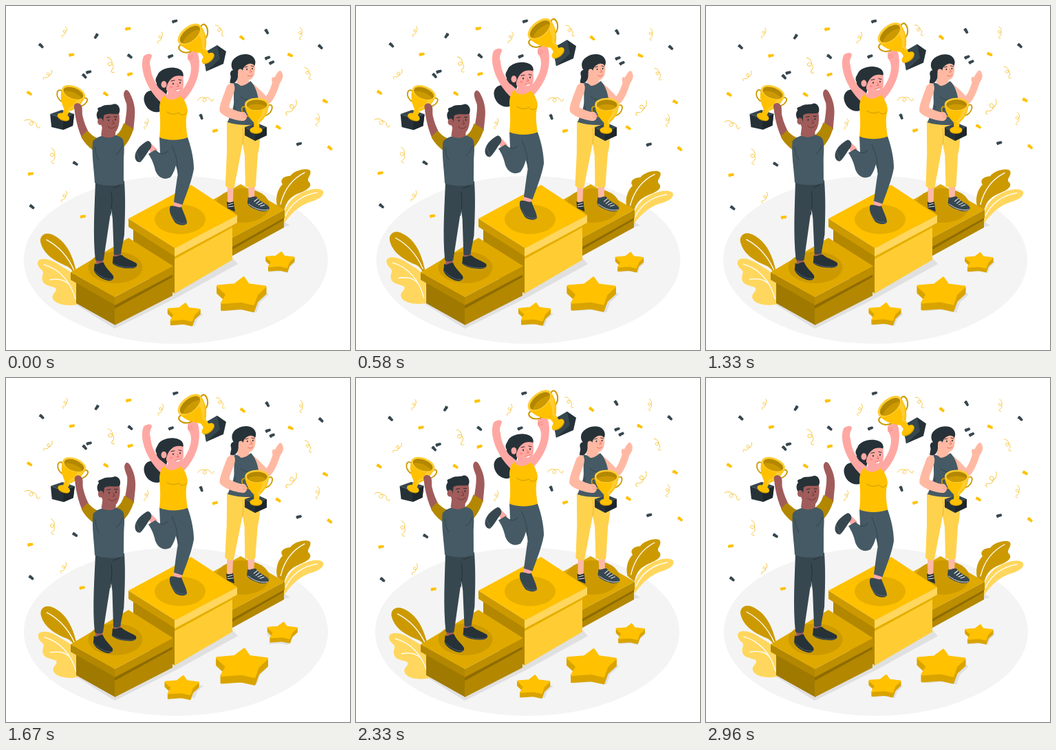
Recreate the animation shown at these times as an HTML page with a canvas. Size 500 px wide and 500 px high, loop 3000 ms.

```html
<!DOCTYPE html>
<html lang="en">
<head>
<meta charset="utf-8">
<title>Winners on a podium</title>
<style>
html, body { margin: 0; width: 100%; height: 100%; overflow: hidden; background: #fff; }
canvas { display: block; width: 500px; height: 500px; }
</style>
</head>
<body>
<canvas id="stage"></canvas>
<script>
const canvas = document.getElementById('stage');
const ctx = canvas.getContext('2d');
const ratio = window.devicePixelRatio || 1;
canvas.width = canvas.height = 500 * ratio;

const GOLD = '#ffc100', LIGHT = '#ffcd33', PALE = '#ffd75e', MID = '#cc9a00', DEEP = '#b38700';
const SIDE_TOP = '#dfa900', SIDE_SPOT = '#cc9a00', SIDE_RIM = '#bc8e00', SIDE_LEFT = '#a07900', SIDE_SHADE = '#8f6c00';
const INK = '#263238', SLATE = '#37474f', STEEL = '#455a64';
const PINK = '#ffa8a3', PEACH = '#ffb9a3', BROWN = '#a05c5a', RED = '#e2574c';

const cache = {};
const path = d => cache[d] || (cache[d] = new Path2D(d));
const fill = (color, d) => { ctx.fillStyle = color; ctx.fill(path(d)); };
const line = (color, d, width = 1) => {
  ctx.strokeStyle = color;
  ctx.lineWidth = width;
  ctx.stroke(path(d));
};
const oval = (color, x, y, rx, ry, turn = 0) => {
  ctx.fillStyle = color;
  ctx.beginPath();
  ctx.ellipse(x, y, rx, ry, turn, 0, Math.PI * 2);
  ctx.fill();
};
const rad = deg => deg * Math.PI / 180;

// Draws inside a saved state, turned and scaled around a point.
function at(x, y, deg, scale, draw) {
  ctx.save();
  ctx.translate(x, y);
  ctx.rotate(rad(deg));
  ctx.scale(scale, scale);
  draw();
  ctx.restore();
}
const pivot = (x, y, deg, scale, draw) =>
  at(x, y, deg, scale, () => { ctx.translate(-x, -y); draw(); });

// Linear interpolation through [phase, value] pairs.
function track(keys, p) {
  let i = 1;
  while (i < keys.length - 1 && p > keys[i][0]) i++;
  const [p0, v0] = keys[i - 1], [p1, v1] = keys[i];
  return v0 + (v1 - v0) * (p - p0) / (p1 - p0);
}
const WIND = [[0, 0], [.25, 1], [.75, -1], [1, 0]];
const JUMP = [[0, 0], [.5, -10], [1, 0]];
const BEAT = [[0, 1], [.1, 1.1], [.2, 1], [.4, 1], [.5, 1.1], [.6, 1], [1, 1]];
const SHAKE = [[0, 0], [.1, -1], [.2, 2], [.3, -4], [.4, 4], [.5, -4], [.6, 4], [.7, -4], [.8, 2], [.9, -1], [1, 0]];

const inkBits = [[51,58,35], [131,44,115], [180,73,30], [120,96,-25], [114,102,40], [239,73,-30], [245,22,-25],
  [379,37,50], [380,75,-30], [386,82,-35], [457,59,35], [284,161,60], [101,229,25], [38,292,30], [426,200,-25]];
const goldBits = [[177,33,-20], [95,71,-20], [34,127,25], [180,99,-25], [145,128,25], [36,244,-20], [112,306,-20],
  [343,46,30], [413,71,15], [304,181,-25], [396,176,25], [464,138,20], [471,206,30]];
const curls = [[84,38,100,.65], [60,100,125,.75], [151,86,60,1], [38,172,15,1], [67,218,75,.95], [84,277,105,.7],
  [223,46,100,.72], [310,36,45,.8], [427,40,80,.72], [438,98,55,.8], [290,137,-10,.95], [414,147,115,1.05],
  [452,165,85,.75], [203,171,95,.65]];

function confetti() {
  for (const [x, y, turn, scale] of curls)
    at(x, y, turn, scale, () => line('#f7c640',
      'M-12-2C-8-7 0-6 1-1C1 3-5 3-4-1C-2-6 6-4 7 0C8 4 11 4 12 0', .9 / scale));
  const bit = color => ([x, y, turn]) =>
    at(x, y, turn, 1, () => fill(color, 'M-4-2Q-2-3 0-2L4-1L4 2Q1 3 0 2L-4 2Z'));
  inkBits.forEach(bit(SLATE));
  goldBits.forEach(bit(GOLD));
}

function leaves() {
  fill(MID, 'M104 394C98 363 88 341 66 332C56 328 47 335 51 346C56 362 71 371 88 378C95 381 100 388 102 398Z');
  line('#fff', 'M59 340C76 349 90 364 99 384', 1.3);
  fill(PALE, 'M104 434C90 437 73 434 69 427C64 418 76 416 72 410C66 407 55 407 53 399C51 391 57 389 52 384C45 378 43 369 53 368C66 367 76 376 85 381C96 387 102 394 104 405Z');
  line('#fff', 'M55 376C77 382 94 400 101 426M64 398C77 396 85 398 92 405', 1.3);
  fill(MID, 'M394 290C391 276 396 265 402 259C397 252 405 247 413 247C418 239 437 234 442 239C445 246 435 251 441 256C446 263 436 268 426 272C412 278 407 285 404 298Z');
  line('#fff', 'M434 242C416 251 404 268 399 288', 1.3);
  fill(PALE, 'M403 312C403 296 412 281 425 274C440 265 456 263 461 269C463 277 452 281 447 283C432 287 419 295 404 316Z');
  line('#fff', 'M452 271C429 275 414 288 406 305', 1.3);
}

function groundShadow() {
  fill('#e0e0e0', 'M95 430L158 469L250 423L337 375L329 366L158 458L102 428ZM330 363L404 321L413 319L405 314L330 355Z');
}

function rightBlock() {
  fill(DEEP, 'M329 337L404 298V322L329 363Z');
  fill(SIDE_RIM, 'M329 337L405 296V308L329 350Z');
  fill(SIDE_SHADE, 'M329 350L404 308V311L329 354Z');
  fill(SIDE_TOP, 'M341 259L405 296L329 337L270 299Z');
  oval(SIDE_SPOT, 344, 290, 39, 25);
}

function middleBlock() {
  fill(DEEP, 'M185 322L246 360V418L185 382Z');
  fill(LIGHT, 'M245 360L329 316V369L245 418Z');
  fill('#e6ae00', 'M245 364L329 319V322L245 368Z');
  fill(MID, 'M178 309L246 352V364L178 321Z');
  fill(PALE, 'M245 352L336 304V315L245 364Z');
  fill(GOLD, 'M269 260L336 304L246 352L178 309Z');
  oval('#e6ae00', 253, 310, 37, 21.5);
}

function leftBlock() {
  fill(SIDE_LEFT, 'M102 400L159 434V464L102 432Z');
  fill(DEEP, 'M158 434L242 389V421L158 464Z');
  fill(SIDE_SHADE, 'M158 435L242 390V394L158 440Z');
  fill(DEEP, 'M94 387L159 423V435L94 398Z');
  fill(SIDE_RIM, 'M158 423L243 378V390L158 435Z');
  fill(SIDE_TOP, 'M178 337L243 378L158 423L94 387Z');
  oval(SIDE_SPOT, 159, 380, 39.5, 23);
}

function star(x, y, scale, shadow) {
  const top = 'M3-23L10-13L34-10L22 1L17 15L-1 11L-28 13L-21 1L-34-11L-10-13Z';
  at(x, y, 0, scale, () => {
    const layer = (color, dy) => {
      ctx.save();
      ctx.translate(0, dy);
      fill(color, top);
      line(color, top, 3);
      ctx.restore();
    };
    if (shadow) {
      ctx.translate(4, 0);
      layer('#e0e0e0', 11);
    } else {
      for (let d = 10; d > 0; d--) layer('#d9a400', d);
      layer(GOLD, 0);
    }
  });
}
const stars = shadow => {
  star(397, 372, .58, shadow);
  star(342, 418, 1, shadow);
  star(260, 447, .66, shadow);
};

function cup(x, y, turn, scale) {
  at(x, y, turn, scale, () => {
    line(MID, 'M-14 4C-24-1-23 16-9 17M14 3C24-6 24 14 9 16', 1.7);
    oval(MID, -1, 36, 8.5, 4.5);
    oval(GOLD, -1, 35, 8.5, 4.3);
    fill(GOLD, 'M-16.5 0C-16 12-9 20-4 25L-4 34H3L4 25C10 20 16 12 16.5 0Z');
    fill(LIGHT, 'M8 8L15 5C13 13 8 19 4 22L2 30L1 22C5 18 7 13 8 8Z');
    oval(LIGHT, 0, 0, 16.5, 9);
    oval(DEEP, 0, .5, 14, 7);
    fill(MID, 'M-13 3C-5-2 7-1 13 3C8 9-8 10-13 3Z');
  });
}

function rightWoman() {
  fill(PEACH, 'M322 258H331L330 287H322ZM352 258H362L361 282H353Z');
  fill(INK, 'M321 284C324 287 328 285 331 284L333 299L322 294Z');
  fill(SLATE, 'M352 278C355 280 359 276 364 277C369 285 380 287 383 293C383 298 377 299 370 298C361 295 352 292 351 286Z');
  line('#fff', 'M361 284L366 280M364 287L369 283M367 289L373 286M370 291L376 289');
  line('#fff', 'M353 288C363 296 374 298 381 296', .8);
  line('#fff', 'M323 289L330 287M323 292L331 291', .9);
  fill('#ffd24d', 'M321 167C333 171 351 171 366 170C370 185 370 200 366 216L363 262C359 265 352 264 348 262L347 217L344 200L332 263C328 267 322 265 319 261L321 214Z');
  line('#e6b52d', 'M344 178C346 186 345 194 344 201', 1);
  // Raised arm, neck and top
  fill(PEACH, 'M357 112C364 116 373 126 378 131C382 126 385 118 387 111C385 106 387 101 390 104C393 99 397 91 400 95C404 101 402 107 398 112C394 125 388 140 381 143C374 143 364 134 358 128Z');
  fill(PEACH, 'M338 98L353 104V113C349 119 339 118 335 111Z');
  fill(STEEL, 'M331 112C335 111 337 113 341 116C346 116 351 113 355 109C361 114 365 124 367 136C366 150 364 160 366 172C351 174 334 173 322 169C327 157 332 147 331 135Z');
  line(SLATE, 'M341 132C347 137 356 138 363 133M333 145C332 154 334 160 339 164');
  // Ponytail, face and fringe
  fill(INK, 'M335 94C329 91 325 95 326 100C328 105 324 109 326 113C333 114 338 107 337 98Z');
  fill(PEACH, 'M340 84C349 76 358 77 361 83C363 95 361 104 355 107C348 109 342 105 340 100Z');
  fill(INK, 'M337 98C330 95 326 90 328 82C331 73 345 68 354 71C362 74 364 82 361 87C357 81 349 84 345 90L342 99Z');
  oval(PEACH, 340.5, 96, 3.5, 4.5);
  oval(INK, 350, 92, .9, 1.2);
  oval(INK, 358, 91, .9, 1.2);
  line(INK, 'M347 89L351 88M356 87L360 88', .9);
  line(RED, 'M351 101C354 103 357 102 358 100M355 92L357 96H354', .8);
  // Trophy and the arm that holds it
  fill(INK, 'M347 176L362 184L379 176V188L362 196L347 188Z');
  fill(SLATE, 'M347 176L365 170L379 176L362 184Z');
  fill('#1d272c', 'M362 184L379 176V188L362 196Z');
  cup(364.5, 143, 0, 1.06);
  fill(PEACH, 'M326 112C333 111 334 120 330 129C327 138 323 145 325 148C332 151 340 155 346 154C352 157 351 166 345 167C335 167 316 161 311 154C308 148 317 128 321 116Z');
  line('#e98f81', 'M343 157L350 159M344 161L350 162', .7);
}

function middleWoman() {
  // Loose hair, with the far arm in front of it
  fill(INK, 'M219 112C220 119 216 123 210 123C203 124 199 131 201 139C203 148 212 156 222 154C229 151 232 144 231 136L236 118Z');
  fill(PINK, 'M200 73C204 69 211 68 212 72C212 76 207 80 210 88C211 103 218 117 234 129L228 143C213 130 202 111 199 95C197 85 198 78 200 73Z');
  fill(INK, 'M220 101C223 91 240 87 250 91C257 93 259 99 257 104C247 105 240 109 237 117L233 125C226 124 219 118 219 112C216 108 218 104 220 101Z');
  // Back leg
  fill(PINK, 'M206 204L211 200L220 209L213 218Z');
  fill(SLATE, 'M206 196C211 197 213 203 210 207C205 213 200 223 195 227C190 228 186 222 188 215C191 206 198 200 206 196Z');
  line('#607078', 'M189 213C192 218 194 222 195 226', .7);
  fill(STEEL, 'M223 190L252 192C252 214 247 240 239 249C229 254 221 249 217 239C215 229 211 221 207 215L217 209C220 211 222 213 224 214Z');
  // Front leg
  fill(PINK, 'M245 280L257 284L254 296L243 293Z');
  fill(STEEL, 'M226 191L264 191C270 208 273 224 273 237C270 254 263 271 256.5 289L244 285C246 270 248 254 250 243C246 229 244 220 241 210Z');
  line(SLATE, 'M241 203C246 213 250 229 250 244M224 214C228 216 232 214 235 211', 1.1);
  fill(SLATE, 'M239 291C245 289 251 294 255 292C258 301 263 309 263 316C259 320 251 319 246 315C241 308 237 300 238 293Z');
  line('#607078', 'M241 305C246 315 253 317 262 316', .7);
  // Near arm, neck and top
  fill(PINK, 'M264 71C266 66 275 64 279 69C282 80 281 92 279 101C275 116 268 127 258 138L248 132C258 121 265 111 268 99C270 90 269 82 264 77Z');
  fill(PINK, 'M236 119L250 126L257 132C254 145 237 147 229 134C234 132 236 127 236 119Z');
  fill(GOLD, 'M230 130C234 137 243 139 254 131C259 135 263 143 264 152C261 163 261 174 264 191C252 196 235 196 223 191C225 175 224 161 223 149C223 140 226 134 230 130Z');
  line(MID, 'M234 154C240 158 246 158 251 155C255 160 260 159 263 155');
  // Face
  fill(PINK, 'M233 108C240 99 252 96 257 101C259 112 258 123 254 128C247 132 237 129 233 122Z');
  fill(INK, 'M226 115C223 102 239 91 252 93C256 94 258 98 257 102C247 99 239 104 235 113L232 121Z');
  oval(PINK, 229.5, 114, 4, 5);
  oval(INK, 243, 113, 1, 1.3);
  oval(INK, 253, 111.5, 1, 1.3);
  line(INK, 'M240 109L245 108M251 107L255 108', 1);
  fill('#fff', 'M246 122C249 122 251 121 253 120C253 124 248 125 246 122Z');
  line(RED, 'M246 122C249 122 251 121 253 120M249 113L251 117H248', .8);
  oval('#ff8b86', 240, 118, 2.2, 1.6);
  // Trophy
  fill(INK, 'M287 69L307 57L320 66L316 84L291 95Z');
  fill(SLATE, 'M286 69L307 57L311 77L291 95Z');
  cup(267, 41, -39, 1.24);
  fill(PINK, 'M264 70C268 66 274 66 278 70L277 78L267 79Z');
  line('#e98680', 'M265 74L271 72M266 77L272 75', .7);
}

function man() {
  // Trophy and its arm
  fill(INK, 'M64 157L83 164L99 157L97 174L83 180L66 176Z');
  fill(SLATE, 'M64 157L81 151L99 157L83 164Z');
  fill('#1d272c', 'M83 164L99 157L97 174L83 180Z');
  cup(98, 126, 21, 1.08);
  fill(BROWN, 'M99 148C97 142 104 139 108 143C112 146 110 153 111 159C113 169 117 178 122 187L111 193C105 181 101 166 99 148Z');
  // Other arm and sleeves
  fill(BROWN, 'M172 124C174 120 178 122 181 129C186 139 188 149 187 160L185 181L172 174C174 162 176 151 175 142C173 136 169 128 172 124Z');
  fill(DEEP, 'M109 190C112 187 115 184 118 181C123 186 127 190 133 192L127 210C120 205 113 198 109 190Z');
  fill(DEEP, 'M171 170C176 173 181 175 185 179C182 190 176 200 169 207L157 189C164 186 168 179 171 170Z');
  // Legs
  fill(BROWN, 'M131 365H142L141 379L131 377ZM157 356H168L167 368L157 367Z');
  fill(SLATE, 'M130 254H172C174 282 173 308 172 333L167 360C164 362 160 362 157 361L155 309L153 294L142 369C138 372 133 371 130 369C126 332 129 290 130 254Z');
  line(INK, 'M153 270C155 281 154 292 152 304M156 264C163 263 166 260 168 257', 1);
  fill(INK, 'M129 374C133 378 137 371 142 373C145 381 152 386 156 392C158 397 153 400 148 399C139 397 129 390 128 384Z');
  fill(INK, 'M156 363C161 366 164 361 169 362C174 367 185 370 190 374C192 379 187 382 178 381C168 381 159 378 155 374Z');
  line('#607078', 'M129 385C138 394 146 398 155 397M156 374C166 380 180 381 189 379', .8);
  // Shirt, neck and head
  fill(STEEL, 'M126 197C130 191 140 188 148 187C157 187 166 188 170 194C173 204 171 215 171 225V258C159 262 141 262 129 257C128 237 124 215 126 197Z');
  line(SLATE, 'M129 205C130 213 132 220 135 224M169 203C167 209 164 213 160 216', 1);
  fill(BROWN, 'M140 174L159 178L159 187C154 193 143 192 138 188Z');
  fill(BROWN, 'M138 157C144 151 158 150 164 155C166 166 164 179 158 184C149 186 140 181 138 172Z');
  fill(INK, 'M137 169C131 164 130 156 134 152C131 147 136 148 139 146C144 142 152 145 157 142C164 142 167 150 164 156C157 158 147 155 142 159L141 169Z');
  oval(BROWN, 137, 168, 4, 5);
  oval(INK, 149, 166, 1, 1.3);
  oval(INK, 159, 165, 1, 1.3);
  line(INK, 'M146 162L151 161M157 161L161 161', 1.1);
  line('#6f3433', 'M155 166L157 171H154M148 175C152 179 157 178 160 174', .9);
}

function draw(now) {
  const t = now + 30;
  const p = t / 1500 % 1, slow = t / 3000 % 1;
  const sway = track(WIND, p);
  ctx.setTransform(ratio, 0, 0, ratio, 0, 0);
  ctx.fillStyle = '#fff';
  ctx.fillRect(0, 0, 500, 500);
  ctx.lineCap = ctx.lineJoin = 'round';

  oval('#f4f4f4', 247 + track(SHAKE, p), 369, 221, 122);
  pivot(250, 164, sway, 1, confetti);
  groundShadow();
  pivot(250, 250, track(WIND, slow), 1, leaves);
  rightBlock();
  pivot(352, 185, sway, 1, rightWoman);
  middleBlock();
  ctx.save();
  ctx.translate(0, .4 + track(JUMP, p));
  middleWoman();
  ctx.restore();
  leftBlock();
  pivot(63, 258, sway, 1, man);
  stars(true);
  pivot(326.5, 411, 0, track(BEAT, p), () => stars(false));
}

let start;
function frame(now) {
  if (start === undefined) start = now;
  draw((now - start) % 3000);
  requestAnimationFrame(frame);
}
draw(0);
requestAnimationFrame(frame);
</script>
</body>
</html>
```
